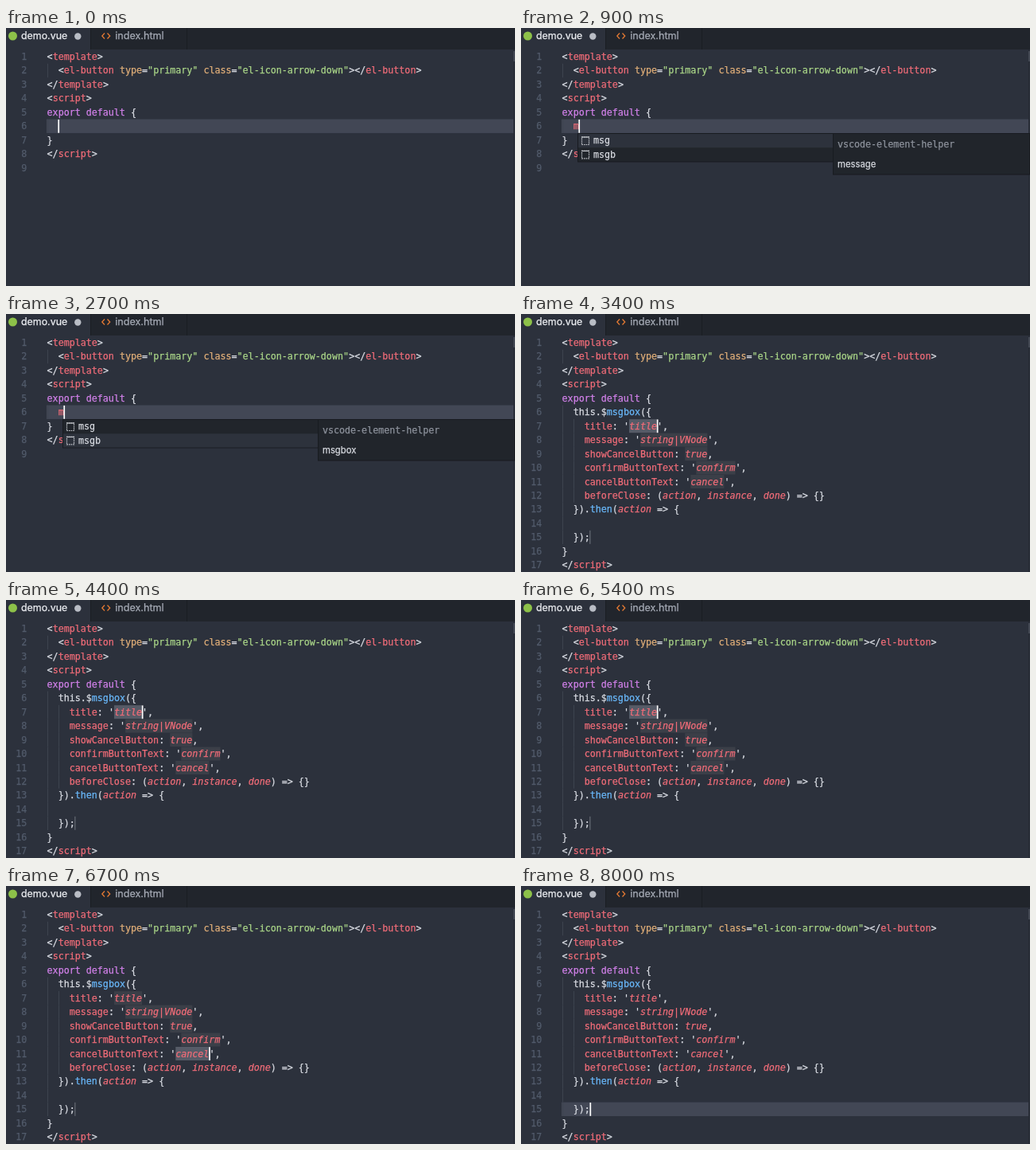
Animation, 640 px wide and 324 px high, one loop 8100 ms. Source, as an HTML page:

```html
<!DOCTYPE html>
<html>
<head>
<meta charset="utf-8">
<style>
  html, body { margin: 0; width: 100%; height: 100%; overflow: hidden; background: #2c313c; }
  svg { display: block; width: 640px; height: 324px; }
  text { white-space: pre; stroke-width: 0.25px; }
  .mono { font: 11.675px "DejaVu Sans Mono", "Liberation Mono", monospace; }
  .italic { font-style: italic; }
  .ui { font-family: Inter, Roboto, sans-serif; }
</style>
</head>
<body>
<svg id="stage" viewBox="0 0 640 324"></svg>
<script>
const LOOP = 8100, X0 = 51.6, CW = 7.029, LH = 17.45;
const stage = document.getElementById('stage');
const colors = { w: '#d9dce3', r: '#f06c78', o: '#e0ae78', g: '#aad688', p: '#d281ea', b: '#69b8fa', i: '#f06c78' };

// "~x" switches the colour; i is red italic
const head = [
  '~w<~rtemplate~w>',
  '  ~w<~rel-button ~otype~w=~g"primary" ~oclass~w=~g"el-icon-arrow-down"~w></~rel-button~w>',
  '~w</~rtemplate~w>',
  '~w<~rscript~w>',
  '~pexport default ~w{'
];
const tail = ['~w}', '~w</~rscript~w>'];
const snippet = [
  '  ~wthis.$~bmsgbox~w({',
  "    ~rtitle~w: '~ititle~w',",
  "    ~rmessage~w: '~istring|VNode~w',",
  '    ~rshowCancelButton~w: ~itrue~w,',
  "    ~rconfirmButtonText~w: '~iconfirm~w',",
  "    ~rcancelButtonText~w: '~icancel~w',",
  '    ~rbeforeClose~w: (~iaction~w, ~iinstance~w, ~idone~w) => {}',
  '  ~w}).~bthen~w(~iaction~w => {',
  '  ',
  '  ~w});'
];
// line, column, length of each snippet field
const fields = [[7, 12, 5], [8, 14, 12], [9, 22, 4], [10, 24, 7], [11, 23, 6]];
// typing, second menu row, snippet, then one step per field
const times = [500, 1800, 3000, 5600, 5900, 6200, 6500, 7100];

const colX = c => X0 + c * CW;
const midY = n => 36 + (n - 1) * LH;

function add(tag, attrs, content) {
  const e = document.createElementNS('http://www.w3.org/2000/svg', tag);
  for (const k in attrs) e.setAttribute(k, attrs[k]);
  if (content) e.textContent = content;
  stage.append(e);
}
const rect = (x, y, width, height, fill) => add('rect', { x, y, width, height, fill });
const mono = (x, y, s, fill, more) => add('text', { class: 'mono', x, y, fill, stroke: fill, ...more }, s);
const label = (x, y, s, fill, size) => add('text', { class: 'ui', x, y, fill, stroke: fill, 'font-size': size }, s);
const path = (d, stroke, width) => add('path', { d, stroke, 'stroke-width': width, fill: 'none' });

function codeLine(n, src) {
  mono(26.3, midY(n) + 4, n, '#525b6b', { 'text-anchor': 'end' });
  const indent = src.match(/^ */)[0].length;
  for (let c = 0; c < indent; c += 2) rect(Math.round(colX(c)), midY(n) - 8.7, 1, LH, '#3d434f');
  let col = 0;
  src.split('~').forEach((part, i) => {
    const key = i ? part[0] : 'w', s = i ? part.slice(1) : part;
    if (s.trim()) mono(colX(col), midY(n) + 4, s, colors[key], key === 'i' ? { class: 'mono italic' } : {});
    col += s.length;
  });
}

const cursor = (n, col) => rect(colX(col) - 0.3, midY(n) - 8.3, 1.7, 16.8, '#fff');
const activeLine = n => rect(51, midY(n) - 8.7, 587, 17.4, '#424755');

function tabs() {
  rect(0, 0, 640, 27, '#21252c');
  rect(0, 0, 106, 27, '#2c313c');
  rect(106, 0, 1, 27, '#1a1d23');
  rect(227, 0, 1, 27, '#1a1d23');
  add('circle', { cx: 8.5, cy: 10, r: 5.5, fill: '#8dc149' });
  label(19, 14, 'demo.vue', '#eceef2', 12.4);
  add('circle', { cx: 90.3, cy: 10.5, r: 4.2, fill: '#b9bdc5' });
  path('M124 6.5L120.8 10L124 13.5M127.5 6.5L130.7 10L127.5 13.5', '#e37933', 1.3);
  label(137.2, 14, 'index.html', '#a6abb6', 12.6);
}

function menu(selected) {
  rect(71, 132, 322, 36.5, '#181b20');
  rect(72, 133, 320, 34.5, '#21252b');
  rect(72, 133 + selected * 17.3, 320, 17.2, '#2d323c');
  ['msg', 'msgb'].forEach((s, i) => {
    const y = 137 + i * LH;
    add('rect', { x: 76.5, y, width: 9, height: 9.5, fill: 'none', stroke: '#c5c8ce', 'stroke-width': 1.2, 'stroke-dasharray': '1.6 1' });
    path(`M76 ${y}H86`, '#c5c8ce', 1.2);
    mono(91, y + 8.4, s, '#d7dae0');
  });
  rect(392, 132, 248, 52.5, '#181b20');
  rect(393, 133, 246, 50.5, '#21252b');
  mono(398, 150, 'vscode-element-helper', '#8d929c');
  label(398, 174.5, selected ? 'msgbox' : 'message', '#d7dae0', 11.3);
}

function draw(step) {
  stage.replaceChildren();
  rect(0, 0, 640, 324, '#2c313c');
  tabs();
  rect(638, 27, 1, 297, '#262a33');
  rect(638, 29, 2, 13, '#444954');

  const expanded = step > 2, field = step - 3;
  const done = field === fields.length;
  if (!expanded) activeLine(6);
  else if (done) activeLine(15);
  else {
    fields.forEach(([n, c, len], i) =>
      rect(colX(c), midY(n) - 8.5, len * CW, 17, i === field ? '#565b67' : '#3b3f48'));
    rect(colX(5) - 0.7, midY(15) - 8.5, 1.5, 17, '#5a5f69');
  }

  const body = expanded ? snippet : [step ? '  ~rm' : '  '];
  [...head, ...body, ...tail].forEach((s, i) => codeLine(i + 1, s));
  if (!expanded) {
    codeLine(9, '');
    cursor(6, step ? 3 : 2);
    if (step) menu(step - 1);
  } else if (done) cursor(15, 5);
  else {
    const [n, c, len] = fields[field];
    cursor(n, c + len);
  }
}

let shown = -1;
function tick() {
  const t = performance.now() % LOOP;
  const step = times.filter(x => x <= t).length;
  if (step !== shown) draw(shown = step);
  requestAnimationFrame(tick);
}
tick();
</script>
</body>
</html>
```
